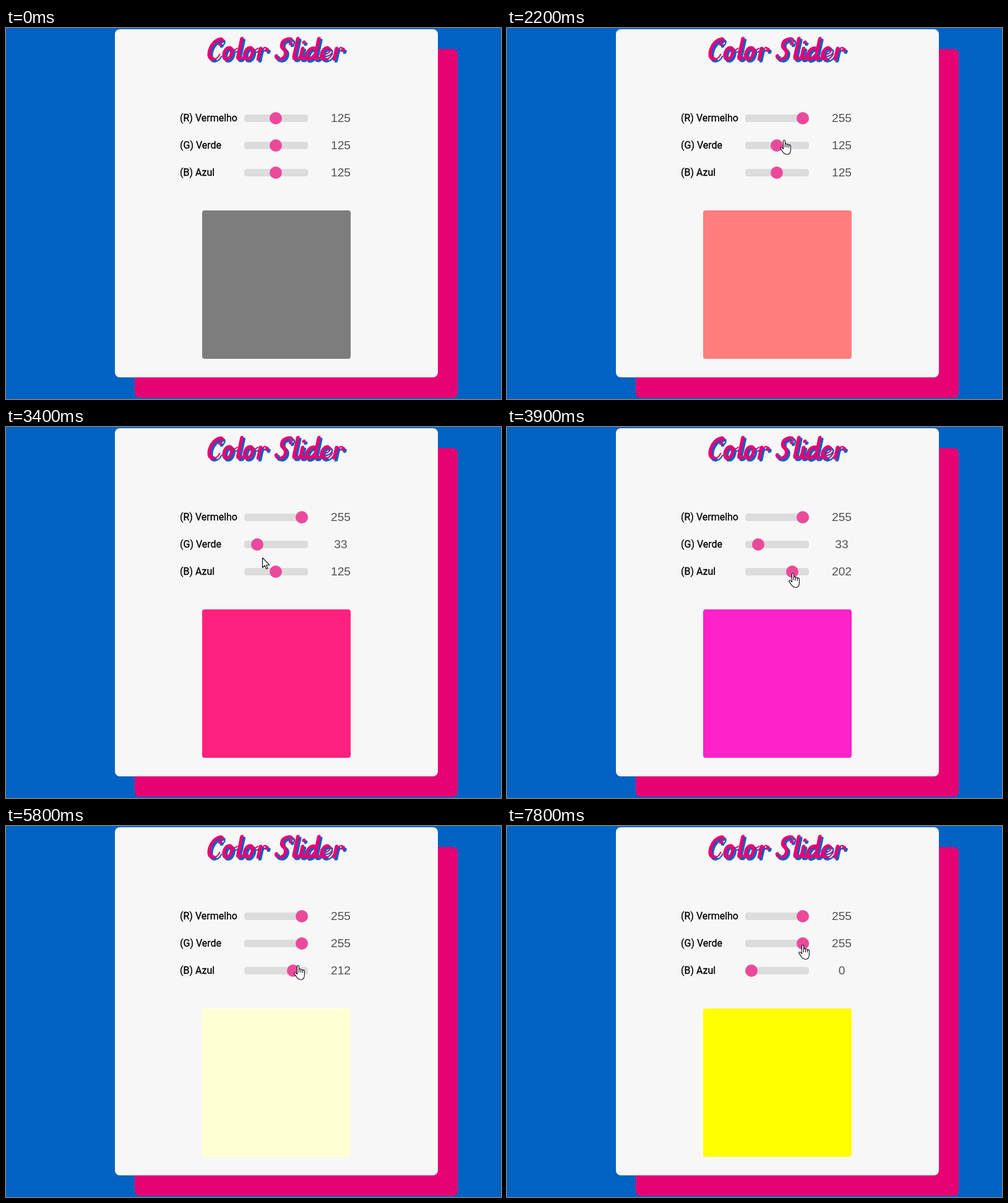
An HTML page for the animation above (8 s loop, 800 px wide and 600 px high).

```html
<!DOCTYPE html>
<html lang="pt">
<head>
<meta charset="utf-8">
<title>Color Slider</title>
<style>
  html, body { margin: 0; width: 100%; height: 100%; overflow: hidden; background: #0062c3; }
  svg { display: block; width: 800px; height: 600px; }
  .label { font: 400 16px Roboto, sans-serif; fill: #000; stroke: #000; stroke-width: .3; }
  .value { font: 19.2px "Liberation Sans", Arial, sans-serif; fill: #505050; text-anchor: middle; }
  #title path { fill: none; stroke: currentColor; stroke-linecap: round; stroke-linejoin: round; }
  .thick { stroke-width: 5.7; }
  .thin { stroke-width: 2.5; }
  .cursor { fill: #fff; stroke: #0a0a18; stroke-width: 1.1; stroke-linejoin: round; stroke-linecap: round; }
</style>
</head>
<body>
<svg viewBox="0 0 800 600">
  <defs><g id="title"></g></defs>

  <rect width="800" height="600" fill="#0062c3"/>
  <rect x="208" y="34" width="522" height="564" rx="8" fill="#e70274"/>
  <rect x="176" y="2" width="522" height="563" rx="8" fill="#f7f7f7"/>

  <g role="img" aria-label="Color Slider">
    <use href="#title" x="3" y="3" color="#0062c3"/>
    <use href="#title" color="#e70274"/>
  </g>

  <g id="rows"></g>
  <rect id="swatch" x="317" y="295" width="240" height="240" rx="4"/>

  <g id="cursor" class="cursor">
    <path id="arrow" d="M.5 .5 V16.5 L4.2 13 L6.7 18.6 L9 17.6 L6.6 12.2 H11.8 Z"/>
    <g id="hand">
      <path d="M5.5 14.5 V2 a1.5 1.5 0 0 1 3 0 V7.5 a1.5 1.5 0 0 1 3 0 V8.5 a1.5 1.5 0 0 1 3 0
        V9.6 a1.45 1.45 0 0 1 2.9 0 V15.5 C17.4 20.5 15.5 23.5 11.6 23.5 C7.8 23.5 5.8 21.5 4.2 18.6
        L1 13.9 C.2 12.3 1.8 11.2 3 12.2 Z"/>
      <path fill="none" d="M8.5 7.5 V11.5 M11.5 8.5 V11.8 M14.5 9.6 V12"/>
    </g>
  </g>
</svg>

<script>
const LOOP = 8000, STEP = 100;
const NS = 'http://www.w3.org/2000/svg';
const $ = id => document.getElementById(id);
const rowY = row => 146 + 44 * row;

function add(parent, tag, attrs, text = '') {
  const el = document.createElementNS(NS, tag);
  for (const k in attrs) el.setAttribute(k, attrs[k]);
  el.textContent = text;
  return $(parent).appendChild(el);
}

// Brush lettering: upright strokes around a baseline, slanted when placed.
const stem = (x, top) => `M${x} ${top} V-8 Q${x} -2 ${x + 5} -4`;
const tail = x => `M${x} -3 q4 -1 5 -8`;
const glyphs = {
  C: { w: 26, thick: 'M19 -35 C2 -35 0 -3 13 -3 M19 -27 h.1', thin: 'M16 -36 C24 -38 24 -30 20 -27 M13 -2 Q20 -2 22 -10' },
  o: { w: 22.5, thick: 'M9 -3 C1 -3 1 -21 9 -21 C17 -21 17 -3 9 -3', thin: 'M13 -19 Q17 -14 22 -20' },
  l: { w: 11, thick: stem(4, -36), thin: tail(9) },
  r: { w: 20, thick: 'M4 -20 V-3 M15 -18 v1', thin: 'M4 -10 C5 -20 11 -24 15 -19' },
  S: { w: 25, thick: 'M13 -35 C2 -33 4 -23 10 -19 C17 -14 15 -4 9 -3 M19 -28 h.1 M0 -8 h.1',
       thin: 'M12 -36 C20 -39 24 -31 19 -28 M9 -2 C3 -1 -2 -4 0 -9' },
  i: { w: 10, thick: stem(4, -20) + 'M4 -30 h.1', thin: tail(9) },
  d: { w: 24, thick: 'M14 -20 C1 -24 0 0 9 -3 Q13 -4 16 -10' + stem(17, -36), thin: tail(22) },
  e: { w: 21, thick: 'M10 -21 C1 -21 0 -3 10 -3', thin: 'M10 -21 C19 -22 17 -10 5 -10 M10 -2 Q17 -2 20 -11' },
  ' ': { w: 12 }
};

let pen = 321;
for (const ch of 'Color Slider') {
  const g = glyphs[ch];
  for (const cls of ['thick', 'thin'])
    if (g[cls]) add('title', 'path', { class: cls, d: g[cls], transform: `translate(${pen} 53) skewX(-12)` });
  pen += g.w;
}

const rows = ['(R) Vermelho', '(G) Verde', '(B) Azul'].map((name, i) => {
  const y = rowY(i);
  add('rows', 'text', { class: 'label', x: 281, y: y + 5 }, name);
  add('rows', 'rect', { x: 385, y: y - 6, width: 103, height: 12, rx: 4, fill: '#dcdcdc' });
  return {
    thumb: add('rows', 'circle', { cy: y, r: 10, fill: '#eb4a9b' }),
    value: add('rows', 'text', { class: 'value', x: 541, y: y + 6 })
  };
});

// Pointer moves: start, end, row, x, and the slider value when dragging.
const moves = [
  [300, 1400, 0, 432],
  [1500, 1600, 0, 448, 162],
  [1600, 1900, 0, 479, 255],
  [2000, 2400, 1, 428],
  [2500, 2800, 1, 410, 63],
  [2900, 3200, 1, 399, 33],
  [3300, 3700, 2, 434],
  [3700, 4000, 2, 458, 212],
  [4100, 4700, 1, 400],
  [4800, 5200, 1, 448, 162],
  [5300, 5500, 1, 476, 255],
  [5500, 6100, 2, 461],
  [6800, 6900, 2, 449, 205],
  [6900, 7300, 2, 386, 0],
  [7400, 7800, 1, 471]
];
const easeOut = p => 1 - (1 - p) ** 2;
const mix = (a, b, p) => a + (b - a) * p;

function stateAt(t) {
  const s = { x: 0, y: 20, rgb: [125, 125, 125] };
  for (const [from, to, row, x, value] of moves) {
    if (t <= from) break;
    const p = easeOut(Math.min(1, (t - from) / (to - from)));
    s.x = mix(s.x, x, p);
    s.y = mix(s.y, rowY(row) + 2, p);
    if (value !== undefined) s.rgb[row] = mix(s.rgb[row], value, p);
  }
  return s;
}

function draw(time) {
  const t = Math.floor(time % LOOP / STEP) * STEP;
  const s = stateAt(t), x = Math.round(s.x), y = Math.round(s.y);
  const rgb = s.rgb.map(Math.round);
  rows.forEach((row, i) => {
    row.thumb.setAttribute('cx', Math.round(395 + 83 * rgb[i] / 255));
    row.value.textContent = rgb[i];
  });
  $('swatch').setAttribute('fill', `rgb(${rgb})`);

  const over = x > 378 && x < 482 && [0, 1, 2].some(r => Math.abs(rowY(r) - y) <= 14);
  $('cursor').setAttribute('transform', `translate(${x} ${y})`);
  $('cursor').style.display = t > moves[0][0] ? '' : 'none';
  $('hand').style.display = over ? '' : 'none';
  $('arrow').style.display = over ? 'none' : '';
}

const start = performance.now();
function tick() {
  draw(performance.now() - start);
  requestAnimationFrame(tick);
}
tick();
</script>
</body>
</html>
```
